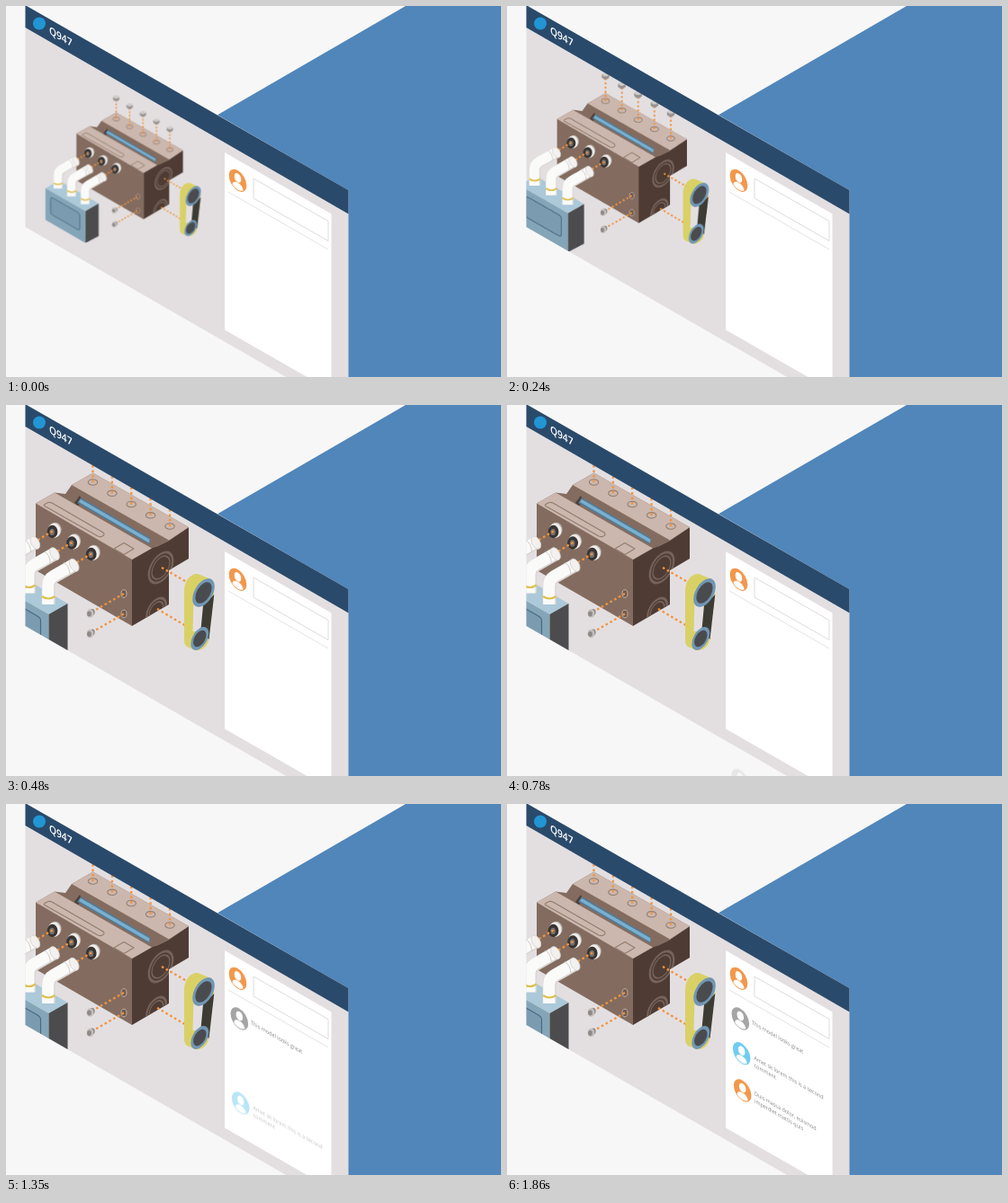
These frames come from a looping animation (550 by 413 pixels, 3240 ms). An HTML page:

```html
<!DOCTYPE html>
<html lang="en">
<head>
<meta charset="utf-8">
<title>Model review</title>
<style>
  html, body { margin: 0; width: 100%; height: 100%; overflow: hidden; background: #f7f7f7; }
  svg { display: block; width: 100vw; height: 100vh; }
  text { font-family: "Open Sans", "Noto Sans", sans-serif; }
  .note { font-size: 6.3px; fill: #858585; }
  .dots { fill: none; stroke: #f3933c; stroke-width: 2.3; stroke-dasharray: 2.6 2.9; }
  .etch { fill: none; stroke: #927c6f; stroke-width: 1.1; stroke-linejoin: round; }

  .model { transform-origin: 182px 217.2px; animation: zoom 3240ms linear infinite; }
  .first { animation: rise1 3240ms linear infinite; }
  .second { animation: rise2 3240ms linear infinite; }
  .third { animation: rise3 3240ms linear infinite; }

  @keyframes zoom {
    0% { transform: scale(.696); }
    14.815%, 100% { transform: scale(1); }
  }
  @keyframes rise1 {
    0%, 17.78% { transform: translateY(220px); opacity: 0; animation-timing-function: cubic-bezier(.37, 0, .63, 1); }
    39.815%, 100% { transform: none; opacity: 1; }
  }
  @keyframes rise2 {
    0%, 39.815% { transform: translateY(110px); opacity: 0; animation-timing-function: cubic-bezier(.333, .667, .667, 1); }
    46.296%, 100% { transform: none; opacity: 1; }
  }
  @keyframes rise3 {
    0%, 50% { transform: translateY(110px); opacity: 0; animation-timing-function: cubic-bezier(.333, .667, .667, 1); }
    57.407%, 100% { transform: none; opacity: 1; }
  }
</style>
</head>
<body>
<svg viewBox="0 0 550 413" preserveAspectRatio="none">
  <defs>
    <clipPath id="canvas"><path d="M21.500 24 380.500 231V453L21.500 246Z"/></clipPath>
    <clipPath id="side"><path d="M140 172 203 136V171L181 184V222L140 246Z"/></clipPath>
    <clipPath id="disc"><circle r="10.300"/></clipPath>

    <g id="avatar">
      <circle r="11.300"/>
      <g fill="#fff" clip-path="url(#disc)">
        <ellipse cy="-3" rx="4.300" ry="4.900"/>
        <path d="M-7.500 11C-7.500 5-5 3.500-2 2.500H2C5 3.500 7.500 5 7.500 11Z"/>
      </g>
    </g>

    <!-- screw hanging above its hole -->
    <g id="screw">
      <ellipse class="etch" rx="5.200" ry="3.200" fill="#bfa79b"/>
      <path class="dots" d="M0 0V-29"/>
      <path d="M-5-35V-31L-2-28.500H2L5-31V-35Z" fill="#98928f"/>
      <path d="M-5-35-2-37.500H2L5-35 2-32.500H-2Z" fill="#d0cbc8"/>
    </g>

    <!-- bolt beside its hole in the front face -->
    <g id="bolt">
      <ellipse cx="131" cy="210" rx="3" ry="4.300" fill="#6d5a4e" stroke="#c5aea2"/>
      <path class="dots" d="M131 210 97 229.500"/>
      <ellipse cx="96" cy="230.500" rx="2.600" ry="3.600" fill="#8a8582"/>
      <ellipse cx="93.500" cy="232" rx="3.900" ry="4.800" fill="#c4bfbc"/>
      <ellipse cx="92.500" cy="232.500" rx="2.400" ry="3" fill="#8f8a87"/>
    </g>

    <g id="port">
      <ellipse cx="1.800" cy="-1.200" rx="6.800" ry="8" fill="#b9b2ae"/>
      <ellipse cx=".5" cy="-.3" rx="7" ry="8.200" fill="#efecea"/>
      <ellipse cx="-1.500" cy="1" rx="5.900" ry="7.200" fill="#383432"/>
      <ellipse cx="-1.900" cy="1.400" rx="2.800" ry="3.700" fill="#77716e"/>
    </g>

    <g id="pipe">
      <path class="dots" d="M74 178 96 165"/>
      <g fill="none">
        <path d="M47.200 222V201Q47.200 194.500 53 191.200L75.500 178.300" stroke="#dad6d3" stroke-width="15"/>
        <path d="M46.700 222V201Q46.700 194 52.500 190.700L75 177.800" stroke="#fafaf9" stroke-width="13"/>
        <path d="M40 213Q47.200 218 54.500 213" stroke="#ddc04f" stroke-width="2.200"/>
        <path d="M64.500 175.500Q70.500 179.500 71 188.500" stroke="#cfcac7"/>
      </g>
      <ellipse cx="75.700" cy="178.200" rx="4.500" ry="7.600" transform="rotate(-28 75.700 178.200)" fill="#f3f1ef" stroke="#d6d1ce" stroke-width=".8"/>
    </g>
  </defs>

  <rect width="550" height="413" fill="#f7f7f7"/>
  <path d="M444 0H550V413H380V205L235 121.300Z" fill="#5086ba"/>
  <path d="M21.500 0H23L380.500 205V453L21.500 246Z" fill="#e3dfe1"/>

  <g clip-path="url(#canvas)">
    <g class="model">
      <!-- tank -->
      <path d="M-16.300 196.500 5 184 68.500 221 47.500 233Z" fill="#abc9d9"/>
      <path d="M-16.300 196.500V247L47.500 284V233Z" fill="#84a5b8"/>
      <path d="M47.500 233 68.500 221V273L47.500 284Z" fill="#4c4c4e"/>
      <path d="M-5 212 35 235Q38.500 237 38.500 240V261Q38.500 264.500 35 262.500L-5 239.500Q-8 238-8 234V214Q-8 210.500-5 212Z" fill="#7b9cb0" stroke="#496a80" stroke-width="1.200"/>

      <!-- block -->
      <path d="M33 109.500 54 97.500 66 99 73 89 96.500 75.500 203 136 181 151 140 172V246L33 184Z" fill="#836c5f"/>
      <path d="M140 172 162 159.500 168 157.500 181 151 203 136V171L181 184V222L140 246Z" fill="#4e3c34"/>
      <path d="M33 109.500 54 97.500 162 159.500 140 172Z" fill="#cbb7ad"/>
      <path d="M73 89 96.500 75.500 203 136 181 150.500Z" fill="#cbb7ad"/>
      <path d="M76 109 82 101 85 107 80 112Z" fill="#4e3c34"/>
      <path d="M83 103 160 148 159 155 79 109Z" fill="#527a94"/>
      <path d="M83 105 159.500 149.500 159 153.500 81 108Z" fill="#7aafcf"/>
      <path class="etch" d="M43 110.500 47 108.500Q49 108 51 109L108 142Q110 144 108 145.500L106 146.500Q104 147 102 146L43 112.500Q41.500 111.500 43 110.500Z"/>
      <path class="etch" d="M120 160 131 153.500 142 160 131 166.500Z"/>

      <g clip-path="url(#side)">
        <g fill="none" stroke="#75635a" stroke-width="2.600">
          <g transform="matrix(.866 -.5 0 1 172 181)"><circle r="15.300"/><circle r="11.500" stroke-width="1.600"/></g>
          <g transform="matrix(.866 -.5 0 1 167 229)"><circle r="12.500"/><circle r="9" stroke-width="1.600"/></g>
        </g>
      </g>

      <use href="#screw" x="96.500" y="86"/>
      <use href="#screw" x="117.900" y="98.300"/>
      <use href="#screw" x="139.200" y="110.500"/>
      <use href="#screw" x="160.600" y="122.800"/>
      <use href="#screw" x="182" y="135"/>

      <use href="#bolt"/>
      <use href="#bolt" y="22.500"/>

      <use href="#port" x="53" y="140"/>
      <use href="#port" x="74.600" y="152.500"/>
      <use href="#port" x="96.200" y="165"/>
      <use href="#pipe" x="-43.400" y="-25"/>
      <use href="#pipe" x="-21.700" y="-12.500"/>
      <use href="#pipe"/>

      <!-- belt drive -->
      <path class="dots" d="M173 181 204 199M168 227 202 247"/>
      <path d="M198 207C198 195 206 187 213 188L223 192C229 194 232 201 231 211L225 262C224 269 217 274 211 273L203 270C199 268 198 266 198 260Z" fill="#d9d166"/>
      <path d="M208.500 218H222L218 252H207.500Z" fill="#e3dfe1"/>
      <path d="M219 223 231.300 211 225.500 261 216.500 250Z" fill="#3d3c34"/>
      <g transform="matrix(.866 -.5 0 1 219.500 209)">
        <circle r="14.200" fill="#7196b4"/><circle r="10.500" fill="#4a4b4f"/>
      </g>
      <g transform="matrix(.866 -.5 0 1 215.300 260)">
        <circle r="11.500" fill="#7196b4"/><circle r="8.300" fill="#4a4b4f"/>
      </g>
    </g>
  </g>

  <!-- header -->
  <path d="M21.500 0H23L380.500 205V231.500L21.500 24Z" fill="#2a4a6b"/>
  <circle cx="37" cy="19.500" r="7" fill="#2196d3"/>
  <text transform="matrix(.866 .5 0 1 48 30.800)" font-size="11.800" font-weight="600" fill="#fff">Q947</text>

  <!-- comment panel -->
  <path d="M243 163 361.500 231.400V428.500L243 360.500Z" fill="#fff"/>
  <path d="M275 192 358 239.500V261.500L275 214Z" fill="none" stroke="#dcdcdc"/>
  <path d="M247 207 358 271" stroke="#e4e4e4"/>
  <use href="#avatar" transform="matrix(.866 .5 0 1 257.500 194.300)" fill="#f2984b"/>

  <g class="first">
    <use href="#avatar" transform="matrix(.866 .5 0 1 259.300 239)" fill="#a5a5a5"/>
    <text class="note" transform="matrix(.866 .5 0 1 272 245)">This model looks great</text>
  </g>
  <g class="second">
    <use href="#avatar" transform="matrix(.866 .5 0 1 260.700 277.700)" fill="#70ccf0"/>
    <text class="note" transform="matrix(.866 .5 0 1 274.500 284.500)">Amet sit lorem this is a second<tspan x="0" dy="8.300">comment</tspan></text>
  </g>
  <g class="third">
    <use href="#avatar" transform="matrix(.866 .5 0 1 261.700 319)" fill="#f2984b"/>
    <text class="note" transform="matrix(.866 .5 0 1 275 324)">Duis massa dolor, euismod<tspan x="0" dy="8.500">imperdiet mattis quis</tspan></text>
  </g>
</svg>
</body>
</html>
```
